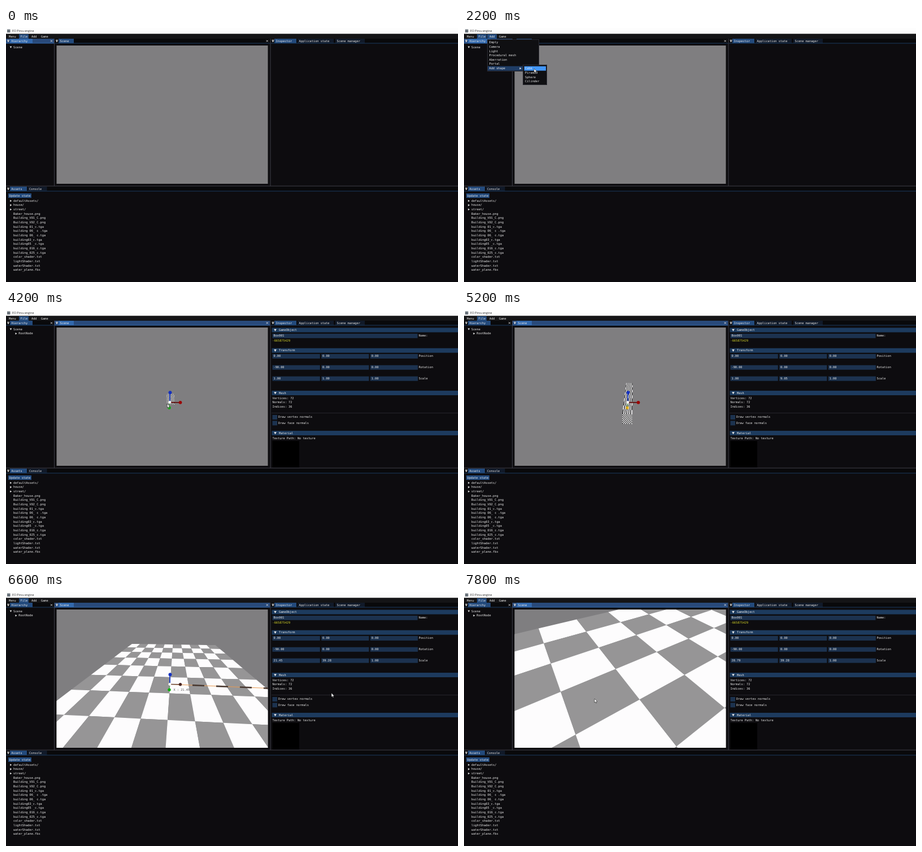
Write an HTML page with a canvas that moves like this. It is 800 px wide and 450 px high and loops after 8000 ms.

```html
<!DOCTYPE html>
<html lang="en">
<head>
<meta charset="utf-8">
<title>Engine editor</title>
<style>
  html, body { margin: 0; width: 100%; height: 100%; overflow: hidden; background: #0d0c0f; }
  canvas { display: block; width: 800px; height: 450px; }
</style>
</head>
<body>
<canvas id="stage" width="800" height="450"></canvas>
<script>
const ctx = document.getElementById('stage').getContext('2d');
const LOOP = 8000, STEP = 200;
const MONO = '5.27px "DejaVu Sans Mono", monospace';
const C = {
  bg: '#0d0c0f', text: '#ececec', line: '#3c3c46', tab: '#234a7c', tabDim: '#111a29', tabLine: '#1b3a61',
  bar: '#294a7a', tabLit: '#3369ad', header: '#1d3b5e', field: '#1c324f', hover: '#4296fa'
};
const VIEW = { x: 89.5, y: 31, w: 374, h: 245 };
const HORIZON = 34;

const FILES = ['defaultAssets/', 'house/', 'street/', 'Baker_house.png', 'Building_V01_C.png',
  'Building_V02_C.png', 'building 01_c.tga', 'building 06_ c .tga', 'building 06_ c.tga',
  'building03_c.tga', 'building05 _c.tga', 'building_016_c.tga', 'building_025_c.tga',
  'color_shader.txt', 'lightShader.txt', 'waterShader.txt', 'water_plane.fbx'];
const ADD_ITEMS = ['Empty', 'Camera', 'Light', 'Procedural mesh', 'Aberration', 'Portal', 'Add shape'];
const SHAPES = ['Cube', 'Piramid', 'Sphere', 'Cilinder'];

// Rows of [time, value...], joined by straight lines.
const SCALE_Y = [[4800, 1], [5000, 4.2], [5200, 9.05], [5600, 25.4], [6000, 39.28]];
const SCALE_X = [[6000, 1], [6200, 5.2], [6600, 21.45], [6800, 27.2], [7000, 28.79]];
const CURSOR = [[1000, 150, 90], [1400, 49, 15], [1800, 60, 55], [2000, 72, 71], [2200, 124, 72],
  [2600, 280, 155], [3200, 282, 157], [4400, 286, 168], [4800, 289, 171], [5200, 289, 174],
  [6000, 290, 200], [6200, 400, 166], [6600, 576, 179], [7000, 640, 181], [7400, 322, 162], [7800, 231, 189]];

function track(rows, t) {
  if (t <= rows[0][0]) return rows[0].slice(1);
  const i = rows.findIndex(r => r[0] >= t);
  if (i < 0) return rows[rows.length - 1].slice(1);
  const a = rows[i - 1], b = rows[i], k = (t - a[0]) / (b[0] - a[0]);
  return a.slice(1).map((v, j) => v + (b[j + 1] - v) * k);
}

function rect(x, y, w, h, color) { ctx.fillStyle = color; ctx.fillRect(x, y, w, h); }

function text(s, x, y, color = C.text, font = MONO) {
  ctx.font = font;
  ctx.fillStyle = color;
  ctx.fillText(s, x, y);
}

function poly(points, color) {
  ctx.beginPath();
  points.forEach(([x, y]) => ctx.lineTo(x, y));
  ctx.closePath();
  ctx.fillStyle = color;
  ctx.fill();
}

function line(x1, y1, x2, y2, color, width = 1, dash = []) {
  ctx.beginPath();
  ctx.setLineDash(dash);
  ctx.moveTo(x1, y1);
  ctx.lineTo(x2, y2);
  ctx.strokeStyle = color;
  ctx.lineWidth = width;
  ctx.stroke();
  ctx.setLineDash([]);
}

function dot(x, y, r, color) {
  ctx.beginPath();
  ctx.arc(x, y, r, 0, Math.PI * 2);
  ctx.fillStyle = color;
  ctx.fill();
}

const arrowRight = (x, y) => poly([[x, y - 1.8], [x + 3, y], [x, y + 1.8]], C.text);
const arrowDown = (x, y, r = 1.8) => poly([[x - r, y - r * .8], [x + r, y - r * .8], [x, y + r]], C.text);

function cross(x, y) {
  line(x - 1.6, y - 1.6, x + 1.6, y + 1.6, C.text, .8);
  line(x - 1.6, y + 1.6, x + 1.6, y - 1.6, C.text, .8);
}

function tabBar(x, y, w, tabs, focused, close) {
  rect(x, y, w, 8, focused ? C.bar : '#09090b');
  tabs.forEach(([label, tx, tw], i) => {
    rect(tx, y, tw, 8, i ? C.tabDim : focused ? C.tabLit : C.tab);
    text(label, tx + 2.6, y + 4.2);
  });
  rect(x, y + 7.5, w, 1, focused ? C.tabLit : C.tabLine);
  line(x + 2, y + 2.2, x + 6, y + 2.2, C.text, .8);
  arrowDown(x + 4, y + 4.8);
  if (close) cross(close, y + 4);
}

function popup(x, y, w, h, items, tx, ty) {
  rect(x, y, w, h, '#0f0f12');
  ctx.strokeStyle = C.line;
  ctx.lineWidth = .6;
  ctx.strokeRect(x + .5, y + .5, w - 1, h - 1);
  return () => items.forEach((s, i) => text(s, tx, ty + i * 7.6));
}

function drawMenus(t) {
  rect(41, 11, 17, 8, C.tab);
  text('Add', 45, 15.2);
  const labels = popup(41, 20, 92, 57, ADD_ITEMS, 44.5, 26);
  if (t >= 2000) rect(42, 67.6, 63, 8, '#1f3d66');
  else if (t >= 1600) rect(42, 52.2, 90, 8, C.hover);
  labels();
  arrowRight(98.5, 71.6);
  if (t < 2000) return;
  const shapes = popup(104, 65, 43, 36, SHAPES, 108, 72);
  if (t >= 2200) rect(106.5, 67.8, 38.5, 7.8, C.hover);
  shapes();
}

// A view maps texture cell (u, v) to homogeneous screen coordinates.
const frontView = (sx, sz) => (u, v) => {
  const x = (u - 5) / 10 * sx, z = (v - 5) / 5 * sz;
  const w = .00855 - .000214 * z - .00003 * x;
  return [299.5 * w - .07 + .1168 * x, HORIZON * w + 1, w].map(n => n / .012);
};
const closeView = (u, v) => {
  const a = .1044 * (u - 2), b = -.1266 * v;
  return [132 + 846 * a + 68 * b, 64.5 - 104 * a - 119 * b, 1 + a + b];
};
const blend = (p, q, k) => (u, v) => {
  const b = q(u, v);
  return p(u, v).map((n, i) => n + (b[i] - n) * k);
};

function checker(points, shade) {
  for (let v = 0; v < 10; v++) for (let u = 0; u < 10; u++) {
    const quad = [[u, v], [u + 1, v], [u + 1, v + 1], [u, v + 1]].map(([a, b]) => points(a, b));
    if (quad.every(p => p[2] > .004))
      poly(quad.map(([x, y, w]) => [x / w, y / w]), (u + v) % 2 ? shade : '#fdfcfd');
  }
}

function drawBox(view, shade) {
  const flat = (u, v) => { const [x, y, w] = view(u, v); return [x / w, y / w, w]; };
  const [, nearY, nearW] = flat(0, 10);
  if (nearW > 0 && nearY > 0 && nearY < VIEW.y + VIEW.h) {
    checker((u, v) => {
      const [x, y] = flat(u, 10);
      return [x, y + (nearY - HORIZON) * .011 * v, 1];
    }, shade);
  }
  checker(view, shade);
}

function moveGizmo() {
  rect(299.5, 150, 6.5, 6, '#2a2ab4');
  rect(299, 167.5, 6, 5, '#3c9a3c');
  line(290, 163, 290, 150, '#00c800', 1.6);
  poly([[287, 150.5], [293, 150.5], [290.5, 144]], '#00c800');
  line(290, 164, 306, 164, '#5c0808', 1.8);
  poly([[305.5, 161], [311, 164], [305.5, 167]], '#a80000');
  line(289.5, 165, 289.5, 170, '#1a2ab0', 1.6);
  poly([[286.5, 169], [292.5, 169], [289.5, 175.5]], '#1a2ab0');
  dot(289.5, 164, 2.4, '#fff');
}

function scaleGizmo(active, value) {
  line(290, 163, 290, 148, '#1638c8', 1.7);
  dot(290.5, 146.2, 2.9, '#1430c0');
  line(289.5, 164, 289.2, 172, '#5ba05b', 1.4);
  dot(289, 173.2, 2.7, active === 'y' ? '#e0b020' : '#0eae0e');
  if (active === 'x') {
    line(291, 163.5, 463.5, 170.5, '#e89a50', 1.1);
    line(330, 165.1, 463.5, 170.6, '#4a3a32', 2.6, [21, 21]);
    line(291, 163.6, 306, 163.8, '#6a4434', 1.5);
    dot(308.5, 163.8, 2.7, '#4a2622');
    text('X : ' + value.toFixed(2), 296.5, 173.2, '#4c4c4c');
  } else {
    line(291, 163.7, 306, 163.9, '#601010', 1.9);
    dot(308.5, 163.8, 2.9, '#9c0404');
  }
  dot(289.8, 163.5, 2.4, '#fff');
}

function drawScene(t, sx, sy) {
  rect(VIEW.x, VIEW.y, VIEW.w, VIEW.h, '#7f7e80');
  ctx.save();
  ctx.beginPath();
  ctx.rect(VIEW.x, VIEW.y, VIEW.w, VIEW.h);
  ctx.clip();
  if (t >= 2400) {
    const k = Math.max(0, (t - 7400) / 400);
    const front = frontView(sx, sy);
    drawBox(k ? blend(front, closeView, k) : front, sx > 4 ? '#969596' : '#3c3c3c');
    if (t >= 2800 && t < 3800) moveGizmo();
    else if (t >= 3800 && t < 7600) {
      const active = t >= 6200 && t < 7000 ? 'x' : t >= 4800 && t < 6000 ? 'y' : '';
      scaleGizmo(active, sx);
    }
  }
  ctx.restore();
}

function section(label, y) {
  rect(470.5, y - 4, 329.5, 8, C.header);
  arrowDown(476.5, y, 2.3);
  text(label, 483, y + .2);
}

function drawInspector(sx, sy) {
  section('GameObject', 35.5);
  rect(471.5, 42, 257, 7.8, C.field);
  text('Box001', 473.5, 46);
  text('Name:', 730.5, 46);
  text('-665875429', 471.5, 55, '#d4d42a');
  section('Transform', 71.7);
  [['Position', 0, 0, 0], ['Rotation', -90, 0, 0], ['Scale', sx, sy, 1]].forEach(([label, ...nums], r) => {
    const y = 82 + r * 19.8;
    nums.forEach((n, i) => {
      rect(471.5 + i * 86.6, y - 4, 84.2, 8, C.field);
      text(n.toFixed(2), 473.5 + i * 86.6, y);
    });
    text(label, 730.5, y);
  });
  section('Mesh', 147);
  ['Vertices: 72', 'Normals: 72', 'Indices: 36'].forEach((s, i) => text(s, 471.5, 156.2 + i * 7.7));
  line(470, 182.5, 800, 182.5, '#2c2c34', .8);
  ['Draw vertex normals', 'Draw face normals'].forEach((s, i) => {
    rect(471.5, 186 + i * 10.4, 8.5, 8, C.field);
    text(s, 482, 190 + i * 10.4);
  });
  section('Material', 218);
  text('Texture Path: No texture', 471.5, 227.3);
  rect(471.5, 232, 47.5, 47, '#000');
}

function drawShell(t) {
  rect(0, 0, 800, 450, C.bg);
  rect(0, 0, 800, 10.5, '#fdfdfd');
  rect(2, 2.5, 5.5, 5.5, '#6b747c');
  text('EO Pirvu engine', 11, 5.4, '#2a2a2a', '5.2px "Open Sans", sans-serif');
  rect(0, 10.5, 800, 8.5, '#141416');
  rect(23, 11, 17, 8, C.tab);
  [['Menu', 5], ['File', 25.5], ['Add', 45], ['Game', 62]].forEach(([s, x]) => text(s, x, 15.2));

  const sceneFocus = t >= 2600;
  tabBar(0, 19, 85, [['Hierarchy', 7, 40]], !sceneFocus, 80.5);
  tabBar(86, 19, 381.5, [['Scene', 93, 27]], sceneFocus, 462.3);
  tabBar(468.5, 19, 331.5, [['Inspector', 475, 39], ['Application state', 516, 64], ['Scene manager', 583, 52]]);
  tabBar(0, 281, 800, [['Assets', 7, 30], ['Console', 38.5, 34]]);
  line(85.5, 19, 85.5, 280, C.line);
  line(468, 19, 468, 280, C.line);
  line(0, 280, 800, 280, C.line);

  arrowDown(8.5, 34);
  text('Scene', 13, 34.2);
  if (t >= 2400) {
    arrowRight(16.5, 41.8);
    text('RootNode', 22.3, 41.9);
  }

  rect(4, 293, 41, 8, C.tab);
  text('Update state', 5.5, 297.2);
  FILES.forEach((name, i) => {
    const y = 306.2 + i * 7.67;
    if (i < 3) arrowRight(7.2, y);
    text(name, 13, y);
  });
}

function drawCursor(x, y) {
  poly([[0, 0], [0, 7], [1.6, 5.6], [2.7, 8], [3.8, 7.5], [2.8, 5.2], [4.9, 5]]
    .map(([a, b]) => [x + a, y + b]), '#fff');
  ctx.strokeStyle = '#222';
  ctx.lineWidth = .6;
  ctx.stroke();
}

function draw(t) {
  const [sx] = track(SCALE_X, t), [sy] = track(SCALE_Y, t);
  ctx.textBaseline = 'middle';
  drawShell(t);
  drawScene(t, sx, sy);
  if (t >= 2600) drawInspector(sx, sy);
  if (t >= 1400 && t < 2400) drawMenus(t);
  const dragging = t >= 4800 && t < 6000;
  if (t >= 1000 && !dragging) drawCursor(...track(CURSOR, t));
}

const start = performance.now();
let shown = -1;
function tick() {
  const t = Math.floor(((performance.now() - start) % LOOP) / STEP) * STEP;
  if (t !== shown) draw(shown = t);
  requestAnimationFrame(tick);
}
tick();
</script>
</body>
</html>
```
